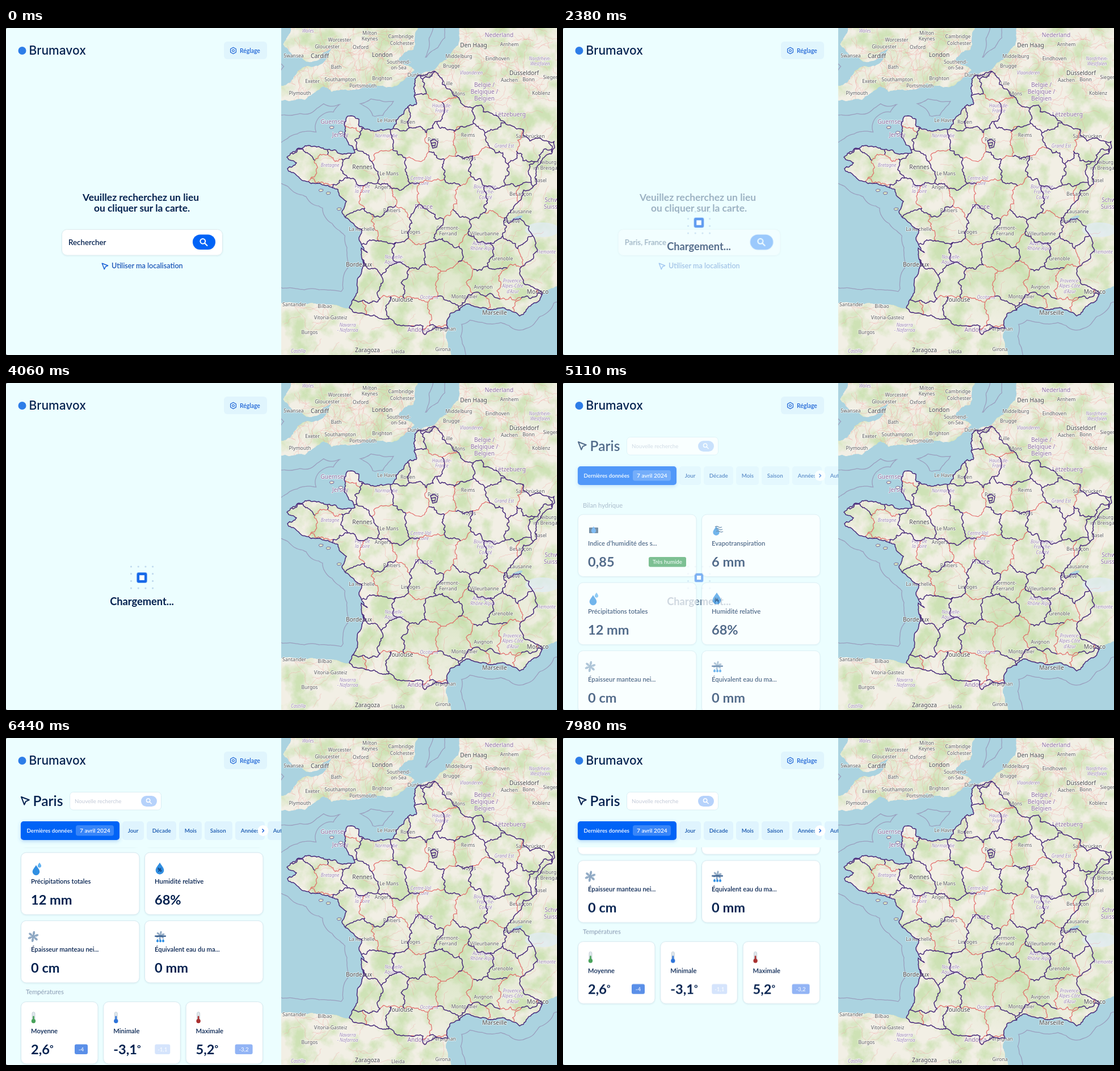
An HTML page that plays this animation: 971 px wide and 577 px high, repeating every 8 s.

```html
<!DOCTYPE html>
<html lang="fr">
<head>
<meta charset="utf-8">
<title>Carte climat</title>
<style>
html, body { margin: 0; width: 100%; height: 100%; overflow: hidden; background: #667; }
svg { display: block; position: absolute; left: 0; top: 0; }
text { font-family: Lato, sans-serif; }
#labels text { font-family: "Noto Sans", sans-serif; paint-order: stroke; stroke: #fffc; stroke-width: 1.6px; stroke-linejoin: round; text-anchor: middle; }
#search, #field, #hint, #query, #loader, #results, #scroll { animation: 8s linear infinite both; }
#search { animation-name: leave; }
#field { animation-name: grow; transform-origin: 240px 378px; }
#hint { animation-name: hintOut; }
#query { animation-name: queryIn; }
#loader { animation-name: wait; }
#results { animation-name: arrive; }
#scroll { animation-name: scroll; }
#pulse { animation: pulse 1.6s -.47s ease-in-out infinite; transform-origin: 239.5px 343.5px; }
@keyframes leave { 0%, 26.9% { opacity: 1 } 31.25%, 100% { opacity: 0 } }
@keyframes grow { 0%, 15.75% { transform: none; animation-timing-function: ease-out } 18.75%, 100% { transform: scale(1.01) } }
@keyframes hintOut { 0%, 20.1% { opacity: 1 } 22.75%, 100% { opacity: 0 } }
@keyframes queryIn { 0%, 19.25% { opacity: 0 } 22.75%, 100% { opacity: 1 } }
@keyframes wait { 0%, 26.9% { opacity: 0 } 31.25%, 61.25% { opacity: 1 } 66.75%, 100% { opacity: 0 } }
@keyframes arrive { 0%, 61.25% { opacity: 0; animation-timing-function: ease-out } 66.75%, 100% { opacity: 1 } }
@keyframes pulse { 0%, 100% { transform: none } 50% { transform: scale(.82) } }
@keyframes scroll {
  0%, 71.75% { transform: none; animation-timing-function: ease-in-out }
  80.5% { transform: translateY(-150px) }
  81.375% { transform: translateY(-150px); animation-timing-function: ease-in-out }
  85.75%, 98% { transform: translateY(-281px) }
  100% { transform: translateY(-253px) }
}
</style>
</head>
<body>
<svg id="stage" width="971" height="577" viewBox="0 0 971 577"></svg>
<script>
let seed = 11;
const rnd = () => (seed = (seed * 16807) % 2147483647) / 2147483647;
const jitter = a => (rnd() - .5) * 2 * a;

// Midpoint displacement turns a few points into a ragged line.
function rough(p, k) {
  const out = [p[0]];
  const split = (a, b) => {
    const dx = b[0] - a[0], dy = b[1] - a[1];
    if (Math.hypot(dx, dy) < 3.5) return out.push(b);
    const o = jitter(k);
    const m = [(a[0] + b[0]) / 2 - dy * o, (a[1] + b[1]) / 2 + dx * o];
    split(a, m);
    split(m, b);
  };
  for (let i = 1; i < p.length; i++) split(p[i - 1], p[i]);
  return out;
}
const coast = (s, k = .2) => rough(s.split(' ').map(p => p.split(',').map(Number)), k);
const path = p => 'M' + p.map(q => q.map(v => v.toFixed(1))).join('L');
const stroke = (d, color, w, extra = '') =>
  `<path d="${d}" fill="none" stroke="${color}" stroke-width="${w}" stroke-linejoin="round" ${extra}/>`;

// ---- Map ----
const england = coast('500,-30 488,28 505,48 550,57 574,36 560,60 514,76 506,90 480,104 480,128 527,127 560,103 574,113 642,98 670,105 700,93 720,74 692,56 718,38 738,-30', .14);
const benelux = coast('813,-30 797,30 778,53 728,83', .1);
const channel = coast('728,83 723,135 692,158 688,169 655,181 623,174 622,161 600,158 610,208 615,220 590,222 570,214 510,218 495,228 512,238 496,248 512,260', .22);
const atlantic = coast('512,260 548,274 585,285 600,306 592,325 627,355 622,372 637,396 626,388 619,448 605,494', .15);
const basque = coast('605,494 545,486 470,479', .1);
const pyrenees = coast('605,494 662,513 695,525 735,526 738,541 779,530');
const catalan = coast('786,620 775,545 779,530', .1);
const gulf = coast('779,530 782,505 815,487 860,496 905,508 945,470', .17);
const riviera = coast('945,470 1000,445', .1);
const frontier = coast('945,470 912,450 905,432 928,408 922,350 906,336 886,345 912,286 935,275 943,235 966,200 890,172 841,148 838,136 808,138 786,112 761,80 728,83');

const mainland = [...benelux, ...channel, ...atlantic, ...basque, [470, 620], ...catalan, ...gulf, ...riviera, [1000, -30]];
const france = path([...channel, ...atlantic, ...pyrenees, ...gulf, ...frontier]);

// A jittered honeycomb of districts: each side is an outer or an inner border.
function districts(dx, dy) {
  const node = [], d = { outer: '', inner: '' };
  for (let j = 0; j < 12; j++) {
    node[j] = [];
    for (let i = 0; i < 20; i++) node[j][i] = [485 + i * dx + jitter(9), 70 + j * dy + (i + j) % 2 * 12 + jitter(9)];
  }
  const side = (a, b) => { d[rnd() < .64 ? 'outer' : 'inner'] += path(rough([a, b], .27)); };
  for (let j = 0; j < 11; j++) for (let i = 0; i < 19; i++) {
    side(node[j][i], node[j][i + 1]);
    if ((i + j) % 2) side(node[j][i], node[j + 1][i]);
  }
  return d;
}

// "_" breaks a label into lines.
const cities = `Worcester 588 24|Milton_Keynes 641 12|Cambridge 696 18|Colchester 698 30|Gloucester 566 36|Oxford 625 37|Swansea 507 52|Bath 582 72
|Southend-_on-Sea 692 63|Exeter 540 97|Southampton 589 94|Brighton 663 92|Portsmouth 629 105|Plymouth 518 118|Dunkerque 730 86
|Middelburg 798 53|Brugge 785 70|Eindhoven 866 57|Aachen 887 95|Bonn 921 94|Koblenz 943 118|Arnhem 887 32|Siegen 960 90`;
const towns = `Lille 779 101|Mons 798 119|Le Havre 672 166|Rouen 708 169|Reims 814 192|Paris 753 200|Troyes 815 233|Le Mans 675 260|Angers 664 284
|Poitiers 680 325|La Rochelle 627 358|Limoges 713 363|Clermont-_Ferrand 779 356|Villeurbanne 843 366|Genève 891 344|Lausanne 907 327
|Besançon 907 296|Grenoble 875 410|Montpellier 808 477|Avignon 841 460|Perpignan 772 534|Girona 770 570|Lleida 691 574
|Vitoria-Gasteiz 572 514|Bilbao 562 494|Santander 508 491|Burgos 535 540|Saarbrücken 924 194|Freiburg_im Breisgau 953 240|Basel 942 272`;
const hubs = 'London 663 51|Cardiff 553 53|Den Haag 824 34|Düsseldorf 913 83|Rennes 628 249|Bordeaux 622 421|Toulouse 696 483|Marseille 861 506|Monaco 937 469|Zaragoza 637 572';
const countries = 'Nederland 869 16|België /_Belgique /_Belgien 843 104|Lëtzebuerg 889 156|France 736 319|Guernsey 577 169|Jersey 589 192|Andorra 727 536|Schweiz/_Suisse/Sv 970 307';
const regions = `Wales 532 8|Vlaanderen 820 82|Nordrhein-_Westfalen 941 57|Hauts-de-_France 768 140|Normandie 670 193|Bretagne 571 245
|Pays de_la Loire 628 282|Centre-Val_de Loire 731 268|Bourgogne-_Franche-_Comté 845 283|Grand Est 878 211|Nouvelle-_Aquitaine 684 407
|Occitanie 746 478|Provence-_Alpes-Côte_d'Azur 893 449|Auvergne-_Rhône-Alpes 840 383|Navarra_- Nafarroa 602 527|Piemonte 952 398|Castilla 515 573`;
const places = s => s.split('|').map(r => {
  const [, name, x, y] = r.trim().match(/^(.+) (\d+) (\d+)$/);
  return { name, x: +x, y: +y };
});
const labels = (s, size, fill, style = '') => `<g font-size="${size}" fill="${fill}" ${style}>` +
  places(s).map(({ name, x, y }) => name.split('_').map((t, i) =>
    `<text x="${x}" y="${y + i * size * 1.16}">${t}</text>`).join('')).join('') + '</g>';

function roads() {
  const stops = [cities, towns, hubs].flatMap(places);
  let d = '';
  stops.forEach((a, i) => stops.slice(i + 1).forEach(b => {
    if (Math.hypot(a.x - b.x, a.y - b.y) < 70) d += path(rough([[a.x, a.y], [b.x, b.y]], .16));
  }));
  for (let i = 0; i < 420; i++) {
    const x = 486 + rnd() * 485, y = rnd() * (i % 2 ? 577 : 150);
    const a = rnd() * 7, len = 12 + rnd() * 30;
    d += path(rough([[x, y], [x + len * Math.cos(a), y + len * Math.sin(a)]], .2));
  }
  return stroke(d, '#f09a9a', .65, 'opacity=".55"');
}
function map() {
  const isles = [[574, 175], [590, 184], [555, 286], [568, 291], [587, 319]]
    .map(([x, y]) => `M${x - 4} ${y}l3 -2l5 1l-1 3l-5 1Z`).join('');
  const land = path(mainland) + 'Z' + path(england) + 'Z' + isles;
  const net = districts(28, 50);
  const purple = '#47297a', water = '#abd3e0';
  return `<clipPath id="land"><path d="${land}"/></clipPath><clipPath id="france"><path d="${france}"/></clipPath>
  <clipPath id="mapBox"><path d="M485.5 0H971V577H485.5Z"/></clipPath>
  <filter id="woods" x="0" y="0" width="1" height="1" color-interpolation-filters="sRGB">
    <feTurbulence type="fractalNoise" baseFrequency=".028" numOctaves="5" seed="4"/>
    <feColorMatrix values="0 0 0 0 .76  0 0 0 0 .87  0 0 0 0 .65  3 0 0 0 -1.2"/></filter>
  <radialGradient id="hills"><stop stop-color="#c3dda8" stop-opacity=".5"/><stop offset="1" stop-color="#c3dda8" stop-opacity="0"/></radialGradient>
  <g clip-path="url(#mapBox)"><rect x="485" width="486" height="577" fill="${water}"/>
  ${stroke(land, '#9a9dbd', 51.5)}${stroke(land, water, 49)}
  <g clip-path="url(#land)"><path d="${land}" fill="#f2efe5"/>
  <rect x="485" width="486" height="577" filter="url(#woods)" opacity=".75"/>
  <ellipse cx="800" cy="410" rx="170" ry="130" fill="url(#hills)"/>
  <ellipse cx="945" cy="356" rx="30" ry="13" fill="#e1edf3" opacity=".8"/>${roads()}
  <ellipse cx="900" cy="336" rx="11" ry="3" fill="${water}" transform="rotate(-22 900 336)"/></g>
  <g id="labels">${labels(cities + '|' + towns, 8.6, '#555')}${labels(hubs, 10.2, '#444')}
  ${labels(countries, 10.2, '#8b6b9e')}${labels(regions, 8, '#9a82b0', 'font-style="italic"')}</g>
  <g clip-path="url(#france)">${stroke(net.inner, '#e35a5c', 1.2, 'opacity=".88"')}${stroke(net.outer, purple, 1.5)}</g>
  ${stroke(isles, '#6b5590', .8)}${stroke(france, purple, 1.5)}
  ${stroke('M748 199L754 196L761 201L759 210L752 212ZM750 203L757 202L756 208L750 207Z', purple, 1.4)}</g>`;
}

// ---- Panel ----
const navy = '#04214f', blue = '#0063f6', link = '#1b62d6';
const T = (x, y, s, size, fill = navy, weight = 600, anchor = 'start') =>
  `<text x="${x}" y="${y}" font-size="${size}" fill="${fill}" font-weight="${weight}" text-anchor="${anchor}">${s}</text>`;
const R = (x, y, w, h, r, fill, extra = '') =>
  `<rect x="${x}" y="${y}" width="${w}" height="${h}" rx="${r}" fill="${fill}" ${extra}/>`;
const arrow = (x, y, k, color) =>
  `<path transform="translate(${x} ${y}) scale(${k})" d="M1 1L14 6L8.5 8.5L6 14Z" fill="none" stroke="${color}" stroke-width="1.9" stroke-linejoin="round"/>`;
const glass = (x, y, k) =>
  `<g transform="translate(${x} ${y}) scale(${k})" fill="none" stroke="#fff" stroke-width="2"><circle cx="-1.2" cy="-1.2" r="4.4"/><path d="M2 2L6.5 6.5" stroke-linecap="round"/></g>`;

const header = () => `<circle cx="28.5" cy="40" r="7" fill="#2d7de8"/>
  <text x="40.5" y="47" font-size="21" font-weight="500" fill="${navy}" style="font-family:Inter,sans-serif">Brumavox</text>
  ${R(384, 24, 76, 31, 6, '#e0f5fd')}
  ${stroke('M400.5 34.3L405.4 37.1V42.7L400.5 45.5L395.6 42.7V37.1Z', link, 1.2)}
  <circle cx="400.5" cy="39.9" r="1.9" fill="none" stroke="${link}" stroke-width="1.1"/>${T(412, 43.5, 'Réglage', 10.4, link)}`;

const search = () => `<g id="search">${T(237.5, 304.5, 'Veuillez recherchez un lieu', 17.4, navy, 700, 'middle')}
  ${T(239.5, 324, 'ou cliquer sur la carte.', 17.4, navy, 700, 'middle')}
  <g id="field">${R(98.5, 355.5, 283, 45.5, 9, '#fff', 'stroke="#dcecef" filter="url(#shade)"')}
  <g id="hint">${T(110, 383, 'Rechercher', 13.3)}</g><g id="query">${T(110, 383, 'Paris, France', 13)}</g>
  ${R(329, 364.5, 40, 26.5, 13.2, blue, 'filter="url(#shade)"')}${glass(348, 377.5, 1)}</g>
  ${arrow(168.5, 414.5, .8, link)}${T(186, 424, 'Utiliser ma localisation', 12.6, '#1b55b8')}</g>`;

function loader() {
  let dots = '';
  for (let i = 0; i < 16; i++) {
    const c = i % 4, r = i >> 2;
    if (c % 3 && r % 3) continue;
    dots += `<circle cx="${220.5 + c * 12.7}" cy="${324 + r * 12.7}" r="1.6" fill="#bfd9ee"/>`;
  }
  return `<g id="loader">${dots}<g id="pulse">${R(232.5, 336.5, 14, 14, 1, '#fff', 'stroke="#1668e8" stroke-width="4.8" stroke-linejoin="round"')}</g>
    ${T(239.5, 392, 'Chargement...', 18.3, navy, 700, 'middle')}</g>`;
}

const drop = (x, y, k, c = '#318fe2') =>
  `<path transform="translate(${x} ${y}) scale(${k})" d="M0 -10C3 -5 7 -1 7 3A7 7 0 0 1 -7 3C-7 -1 -3 -5 0 -10Z" fill="${c}"/>`;
const flake = (x, y, k, c) => {
  let s = '';
  for (let a = 10; a < 360; a += 60) s += `<path d="M0 0V-9.5M-2 -6H2" transform="rotate(${a})"/>`;
  return `<g transform="translate(${x} ${y}) scale(${k})" stroke="${c}" stroke-width="3">${s}</g>`;
};
const wave = (x, y) => `M${x} ${y}q3 -2 6 0t6 0`;
const icons = {
  soil: (x, y) => R(x + 2, y - 5, 16, 10, 1, '#3d5878') + drop(x + 10, y - 1, .6, '#4a9cf0'),
  vapor: (x, y) => drop(x + 8, y + 1, .8) + stroke([0, 1, 2].map(i => wave(x + 6 + i, y - 6 + i * 4)).join(''), '#355f8c', 1.4),
  rain: (x, y) => drop(x + 9, y + 3, .9) + drop(x + 15, y - 6, .45, '#63b3f2'),
  damp: (x, y) => drop(x + 9, y, 1.05) + T(x + 9, y + 6, '%', 9, navy, 700, 'middle'),
  snow: (x, y) => flake(x + 4, y, 1, '#8fa9c4'),
  melt: (x, y) => flake(x + 10, y - 2, .8, '#93abc4') + R(x, y - 2, 20, 2.4, 1, '#2d568a') + [5, 10, 15].map(i => drop(x + i, y + 7, .3)).join(''),
  heat: (x, y, c) => R(x + 2, y - 10, 5, 15, 2.5, '#dfe7ec', 'stroke="#b6c3cc" stroke-width=".7"') + R(x + 3.2, y - 3, 2.6, 10, 1, c) + `<circle cx="${x + 4.5}" cy="${y + 6}" r="3.7" fill="${c}"/>`
};
function card(x, y, w, [icon, name, value, tint, note, noteFill, noteW]) {
  const figure = value.replace('°', '<tspan font-size="16" dy="-5">°</tspan>');
  const nx = x + w - 18 - noteW;
  return R(x, y, w, 109.5, 9, '#fff', 'stroke="#d6e8ef" filter="url(#shade)"') +
    icons[icon](x + 17.5, y + 28, tint) + T(x + 17.5, y + 55, name, 11.3) + T(x + 17.5, y + 92, figure, 23.6, navy, 700) +
    (note ? R(nx, y + 75, noteW, 17.5, 3, noteFill) + T(nx + noteW / 2, y + 87.3, note, 9.8, '#fff', 400, 'middle') : '');
}

const water = [
  ['soil', 'Indice d’humidité des s...', '0,85', '', 'Très humide', '#43a05b', 66],
  ['vapor', 'Evapotranspiration', '6 mm'],
  ['rain', 'Précipitations totales', '12 mm'],
  ['damp', 'Humidité relative', '68%'],
  ['snow', 'Épaisseur manteau nei...', '0 cm'],
  ['melt', 'Équivalent eau du ma...', '0 mm']
];
const heat = [
  ['heat', 'Moyenne', '2,6°', '#48a35a', '-4', '#5a8fe8', 23],
  ['heat', 'Minimale', '-3,1°', '#2d73d9', '-1,1', '#d5e4fc', 27],
  ['heat', 'Maximale', '5,2°', '#a92f2f', '-3,2', '#92b4f5', 31]
];
function tabs() {
  let x = 205, s = '';
  for (const [name, w] of [['Jour', 38], ['Décade', 52], ['Mois', 40], ['Saison', 49], ['Années', 52], ['Aut', 40]]) {
    s += R(x, 147, w, 33, 5, '#dff4fe') + T(x + 9.7, 167, name, 9.8, '#1555ae');
    x += w + 5;
  }
  return s;
}
const results = () => `<g id="results">${arrow(26, 103, 1.05, navy)}${T(47.5, 120, 'Paris', 24.6)}
  ${R(112.5, 95.5, 161, 31.5, 6, '#fff', 'stroke="#d9eef4"')}${T(121, 115, 'Nouvelle recherche', 9.7, '#c3cad8', 400)}
  ${R(238, 102, 28, 19, 9.5, '#b6d2fb')}${glass(251.5, 111, .72)}${tabs()}
  ${R(26, 147, 174, 33, 5, blue, 'filter="url(#glow)"')}${T(36.5, 167, 'Dernières données', 9.7, '#fff')}
  ${R(123, 154, 67, 18.5, 4, '#ffffff38')}${T(130, 167, '7 avril 2024', 10.2, '#fff')}
  <circle cx="453" cy="163.5" r="9.5" fill="#fff"/>${stroke('M451.5 160.5L454.5 163.5L451.5 166.5', link, 1.5)}
  <g clip-path="url(#view)"><g id="scroll">${T(35, 220, 'Bilan hydrique', 11.2, '#8a9bb3', 400)}
  ${water.map((c, i) => card(26.5 + i % 2 * 218, 232 + (i >> 1) * 120.2, 208.5, c)).join('')}
  ${T(35, 602, 'Températures', 11.2, '#8a9bb3', 400)}
  ${heat.map((c, i) => card(26.5 + i * 145.3, 615.5, 135.5, c)).join('')}</g></g></g>`;

document.getElementById('stage').innerHTML = `<defs>
  <filter id="shade" x="-10%" y="-20%" width="120%" height="150%"><feDropShadow dx="0" dy="1" stdDeviation="1.2" flood-color="#28587a" flood-opacity=".1"/></filter>
  <filter id="glow" x="-10%" y="-30%" width="120%" height="170%"><feDropShadow dx="0" dy="2" stdDeviation="3" flood-color="#4a90e8" flood-opacity=".4"/></filter>
  <clipPath id="view"><rect y="193" width="486" height="384"/></clipPath></defs>
  ${R(0, 0, 495, 577, 3, '#ecfeff')}${header()}${search()}${loader()}${results()}${map()}`;
</script>
</body>
</html>
```
